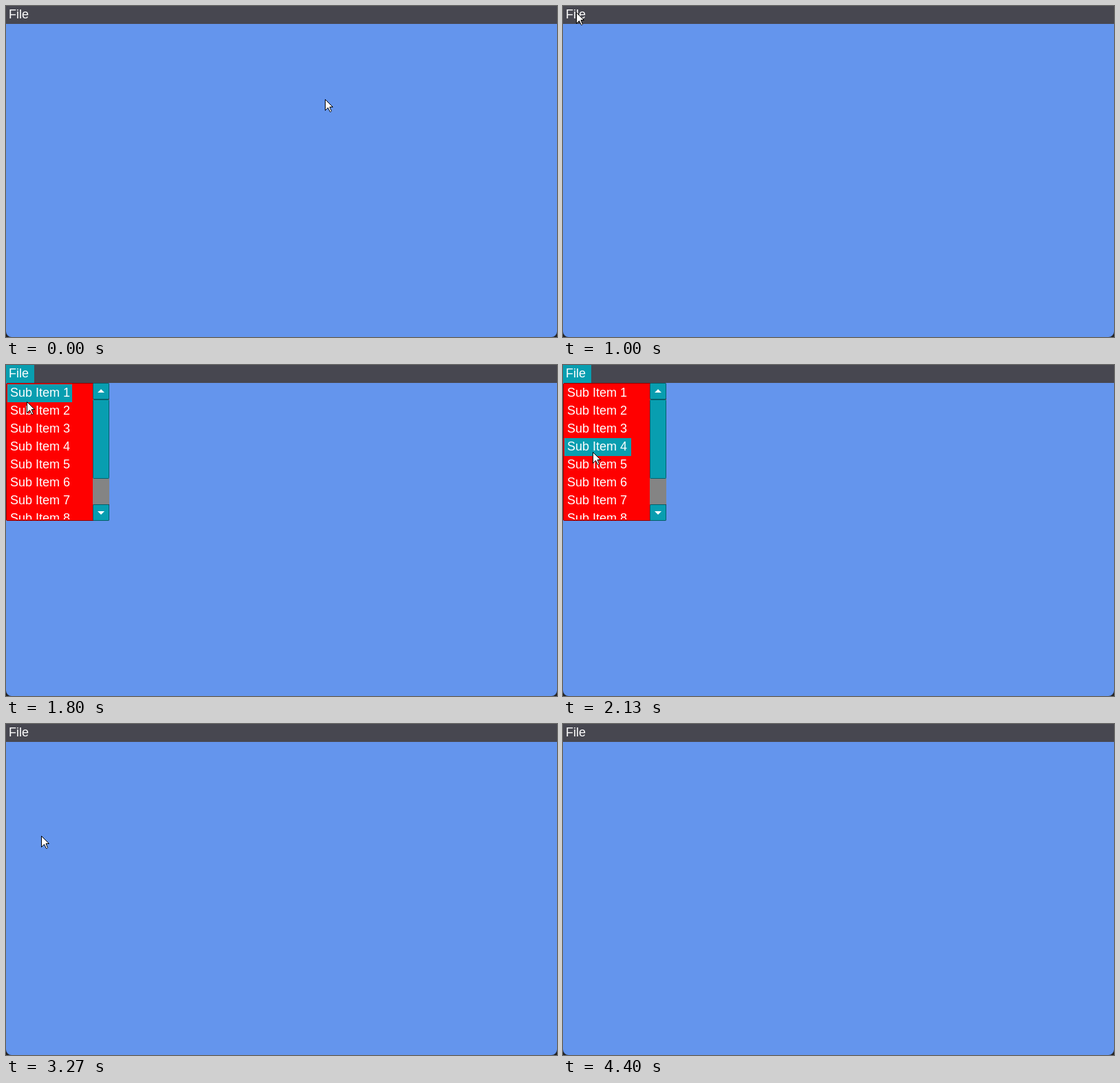
These frames come from a looping animation (800x480 px, 5400 ms). An HTML page:

```html
<!DOCTYPE html>
<html lang="en">
<head>
<meta charset="utf-8">
<title>Scrolling menu</title>
<style>
  html, body { margin: 0; width: 100%; height: 100%; overflow: hidden; background: #222; }
  svg { display: block; width: 800px; height: 480px; }
  text { font: 18px "Liberation Sans", Arial, sans-serif; fill: #fff; white-space: pre; }
  .teal { fill: #089eb0; }
  .edge { stroke: #05606c; }
</style>
</head>
<body>
<svg viewBox="0 0 800 480">
  <defs><clipPath id="list"><rect x="1" y="27" width="125" height="197"/></clipPath></defs>
  <path fill="#6495ed" d="M0 0H800V472a8 8 0 0 1-8 8H8a8 8 0 0 1-8-8Z"/>
  <rect width="800" height="26" fill="#474750"/>
  <rect id="fileGlow" class="teal" width="41" height="26"/>
  <text x="4" y="18">File</text>
  <g id="menu">
    <rect x=".5" y="26.5" width="149" height="199" rx="1.5" fill="#f00" stroke="#900000"/>
    <g clip-path="url(#list)">
      <rect id="itemGlow" class="teal" x="2" height="26"/>
      <g id="items"></g>
    </g>
    <rect x="126" y="50" width="24" height="152" fill="#848484"/>
    <g class="teal edge">
      <rect x="126.5" y="26.5" width="23" height="23" rx="1"/>
      <rect x="126.5" y="50.5" width="23" height="114" rx="1"/>
      <rect x="126.5" y="202.5" width="23" height="23" rx="1"/>
    </g>
    <path fill="#fff" d="M133 40l5-5 5 5ZM133 212h10l-5 5Z"/>
  </g>
  <path id="cursor" fill="#fff" stroke="#000" d="M.5 .5V16.5L4.5 12.5 7.5 18.5H8.5L9.5 17.5 7 11.5H11.5Z"/>
</svg>
<script>
const LOOP = 5400, STEP = 1000 / 15;
const OPEN = 16, CLOSE = 49;          // steps at which the menu is shown and hidden
const LIST_TOP = 28, ROW = 26;

// Pointer path: step, x, y
const path = [
  [0, 463, 135], [9, 43, 10], [15, 19, 9], [24, 19, 9], [27, 30, 53], [32, 43, 126],
  [33, 45, 143], [38, 51, 162], [56, 51, 162], [61, 32, 330], [65, 41, 472], [66, 43, 510]
];

const $ = id => document.getElementById(id);
const show = (id, on) => $(id).setAttribute("visibility", on ? "visible" : "hidden");

for (let i = 0; i < 8; i++) {
  const label = document.createElementNS("http://www.w3.org/2000/svg", "text");
  label.setAttribute("x", 6);
  label.setAttribute("y", LIST_TOP + ROW * i + 18);
  label.textContent = "Sub Item " + (i + 1);
  $("items").append(label);
}

function slope(i, axis) {
  const a = path[i], b = path[i + 1];
  return a && b ? (b[axis] - a[axis]) / (b[0] - a[0]) : 0;
}

// Harmonic mean of neighbouring slopes keeps the curve free of overshoot
function tangent(i, axis) {
  const before = slope(i - 1, axis), after = slope(i, axis);
  return before * after > 0 ? 2 * before * after / (before + after) : 0;
}

function position(step, axis) {
  const next = path.findIndex(key => key[0] > step);
  if (next < 0) return path.at(-1)[axis];
  const a = path[next - 1], b = path[next];
  const span = b[0] - a[0], u = (step - a[0]) / span, v = 1 - u;
  return Math.round(
    a[axis] * (1 + 2 * u) * v * v + b[axis] * u * u * (3 - 2 * u) +
    span * u * v * (tangent(next - 1, axis) * v - tangent(next, axis) * u));
}

function draw(time) {
  const step = Math.floor((time % LOOP + 3.4) / STEP);
  const x = position(step, 1), y = position(step, 2);
  const open = step >= OPEN && step < CLOSE;
  const row = Math.floor((y - LIST_TOP) / ROW);
  show("fileGlow", open);
  show("menu", open);
  show("itemGlow", open && row >= 0);
  $("itemGlow").setAttribute("y", LIST_TOP + ROW * row);
  $("itemGlow").setAttribute("width", row ? 97 : 94);
  $("cursor").setAttribute("transform", `translate(${x} ${y})`);
}

const start = performance.now();
function tick() {
  draw(performance.now() - start);
  requestAnimationFrame(tick);
}
tick();
</script>
</body>
</html>
```
